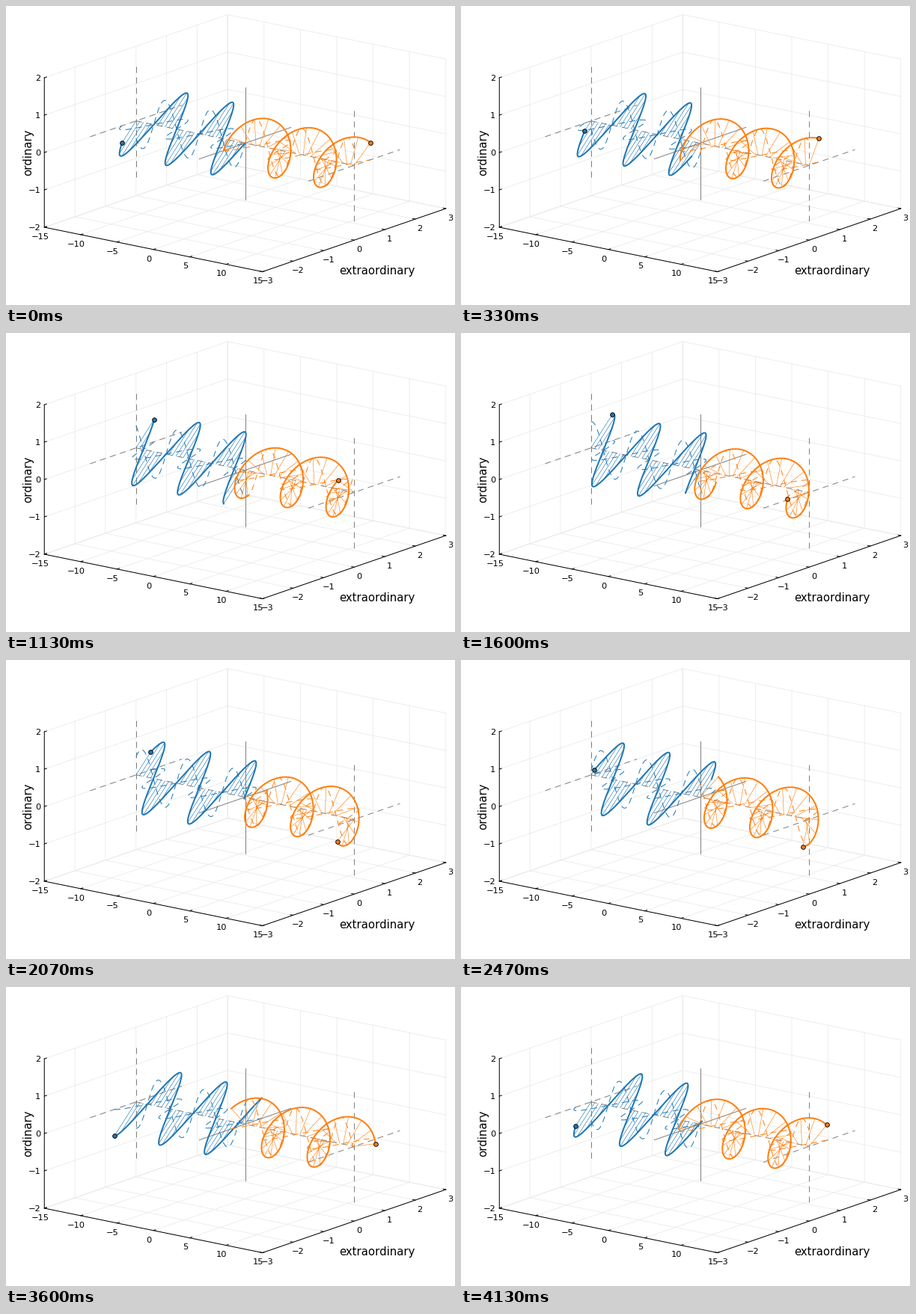
These frames come from a looping animation (600 px wide and 400 px high, 4190 ms). A matplotlib script:

```python
import numpy as np
import matplotlib.pyplot as plt
from matplotlib.animation import FuncAnimation

W, H, DPI = 600, 400, 100
LOOP, FRAMES = 4190, 63
PX = 72 / DPI
BLUE, ORANGE, GRAY = "#1f77b4", "#ff7f0e", "#808080"
AMP = np.sqrt(0.5)
DASHED = (0, (8 * PX, 6 * PX))
GAP = (np.nan,) * 3

plt.rcParams["font.family"] = "DejaVu Sans"
plt.rcParams["lines.scale_dashes"] = False

fig = plt.figure(figsize=(W / DPI, H / DPI), dpi=DPI, facecolor="white")
ax = fig.add_axes([0, 0, 1, 1])
ax.set_xlim(0, W)
ax.set_ylim(H, 0)
ax.axis("off")


def project(x, y, z):
    """Orthographic view of data space in pixels."""
    return (319.5 + 9.717 * x + 40.83 * y,
            183.5 + 1.983 * x - 14.08 * y - 50 * z)


def path(*points, color="black", width=1.0, dash=False, **kw):
    px, py = project(*np.array(points, float).T)
    return ax.plot(px, py, color=color, lw=width * PX,
                   ls=DASHED if dash else "-", **kw)[0]


def tick_label(point, dx, dy, value, ha="center"):
    px, py = project(*point)
    ax.text(px + dx, py + dy, str(value).replace("-", "\u2212"),
            fontsize=8.2, ha=ha, va="center_baseline")


def axis_label(px, py, text, **kw):
    ax.text(px, py, text, fontsize=10.7, ha="center", va="center", **kw)


def draw_box():
    grid = []
    tx, ty = 0.012 * 30, 0.012 * 6
    for x in range(-15, 16, 5):
        grid += [(x, -3, -2), (x, 3, -2), (x, 3, 2), GAP]
        path((x, -3, -2), (x, -3 + ty, -2))
        tick_label((x, -3, -2), -6, 11.8, x)
    for y in range(-3, 4):
        grid += [(15, y, -2), (-15, y, -2), (-15, y, 2), GAP]
        path((15, y, -2), (15 - tx, y, -2))
        tick_label((15, y, -2), 6.3, 11.5, y)
    for z in range(-2, 3):
        grid += [(-15, -3, z), (-15, 3, z), (15, 3, z), GAP]
        path((-15, -3, z), (-15, -3 + ty, z))
        tick_label((-15, -3, z), -5, 0.2, z, ha="right")
    # One path, so shared edges are not darkened twice.
    path(*grid, alpha=0.08, width=0.9, zorder=0)
    path((-15, -3, 2), (-15, -3, -2), (15, -3, -2), (15, 3, -2))
    axis_label(495.6, 354, "extraordinary")
    axis_label(29.5, 196, "ordinary", rotation=90)


def draw_guides():
    for x in (-15, 0, 15):
        dash = x != 0
        path((x, 0, -1.5), (x, 0, 1.5), color=GRAY, dash=dash)
        path((x, -1.5, 0), (x, 1.5, 0), color=GRAY, dash=dash)
    path((-15, 0, 0), (15, 0, 0), color=GRAY, dash=True)


class Wave:
    def __init__(self, start, end, tip, color, field):
        self.x = np.linspace(start, end, 301)
        self.stem_x = np.linspace(start, end, 31)
        self.tip, self.field = tip, field
        origin = (0, 0, 0)
        self.stems = path(origin, color=color, width=0.6)
        self.side = path(origin, color=color, dash=True)
        self.rise = path(origin, color=color, dash=True)
        self.curve = path(origin, color=color, width=2)
        self.dot = path(origin, color=color, marker="o", ms=5.7 * PX,
                        mec="black", mew=0.9 * PX)

    def update(self, t):
        x = self.x
        y, z = self.field(x - t)
        self.curve.set_data(*project(x, y, z))
        self.side.set_data(*project(x, y, 0 * x))
        self.rise.set_data(*project(x, 0 * x, z))

        s = self.stem_x
        foot = project(s, 0 * s, 0 * s)
        head = project(s, *self.field(s - t))
        gap = np.full_like(s, np.nan)
        self.stems.set_data(*(np.column_stack([a, b, gap]).ravel()
                              for a, b in zip(foot, head)))

        px, py = project(self.tip, *self.field(self.tip - t))
        self.dot.set_data([px], [py])


def linear(p):
    return AMP * np.sin(p), AMP * np.sin(p)


def circular(p):
    return -AMP * np.cos(p), AMP * np.sin(p)


draw_box()
draw_guides()
waves = [Wave(-15, 0, -15, BLUE, linear), Wave(0, 15, 15, ORANGE, circular)]


def update(i):
    for wave in waves:
        wave.update(0.1 * i)
    return []


anim = FuncAnimation(fig, update, frames=FRAMES, interval=LOOP / FRAMES,
                     repeat=True, repeat_delay=0, blit=False)
plt.show()
```
